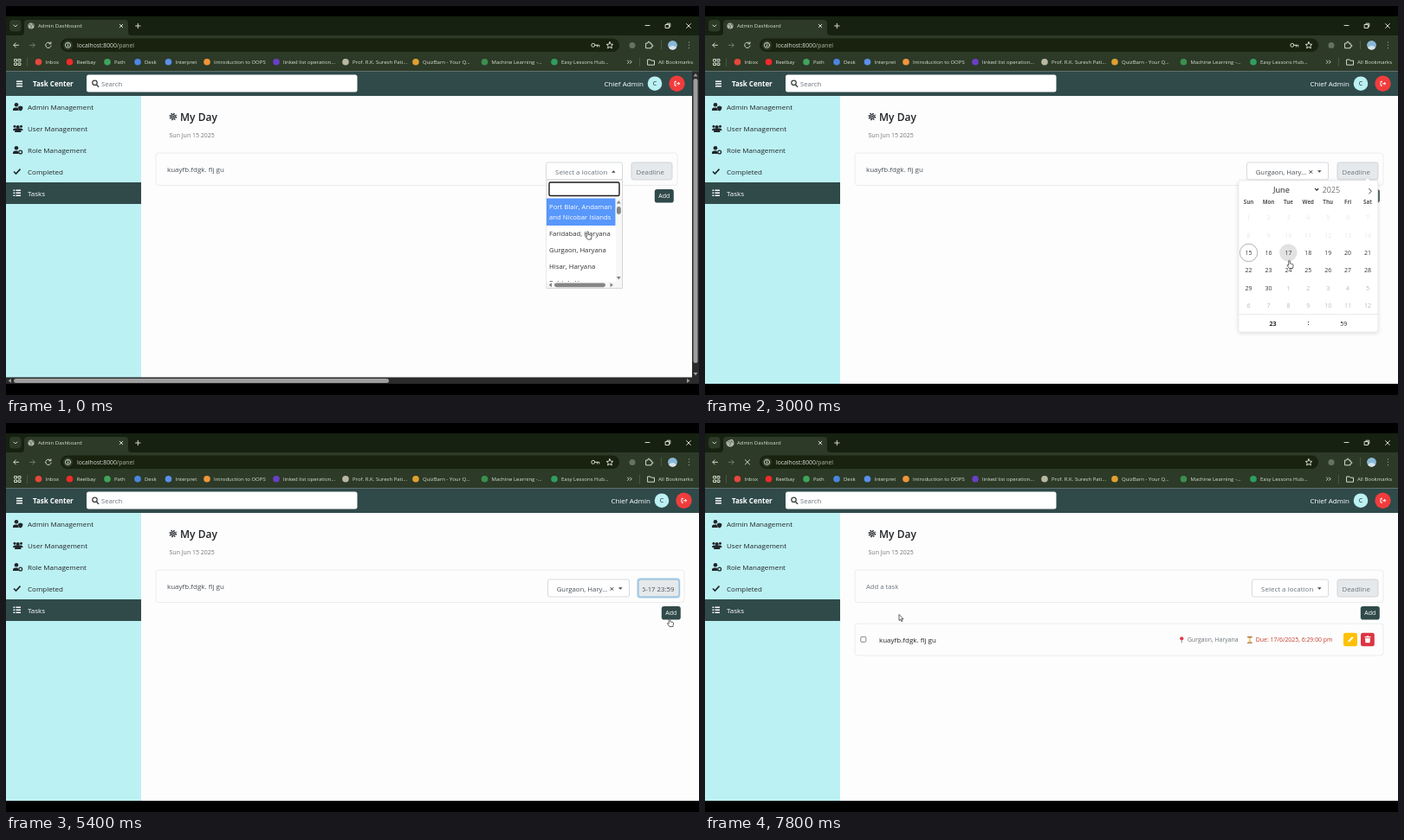
Animation, 800 px wide and 450 px high, one loop 8000 ms. Source, as an HTML page:

```html
<!DOCTYPE html>
<html lang="en">
<head>
<meta charset="utf-8">
<title>Admin Dashboard</title>
<style>
  html, body { margin: 0; width: 100%; height: 100%; overflow: hidden; background: #000; }
  svg { display: block; width: 100%; height: 100%; }
  text { font: 8px "Open Sans", "Noto Sans", sans-serif; fill: #212529; white-space: pre; }
  .ui text { font-size: 6px; fill: #dbe2d6; }
  .ui .url { font-size: 6.8px; }
  .line { fill: none; stroke: #d3dacd; stroke-width: 1; stroke-linecap: round; stroke-linejoin: round; }
  .mid { text-anchor: middle; }
  .white { fill: #fff; }
  .grey { fill: #6c757d; }
  .b { font-weight: 700; }
  .s7 { font-size: 7px; }
  .field { fill: #fff; stroke: #ccd1d6; stroke-width: .8; }
  .slate { fill: #304a4a; }
  .card { fill: #fdfdfd; stroke: #e6e8e9; stroke-width: .8; }
</style>
</head>
<body>
<svg viewBox="0 0 800 450">
  <defs>
    <clipPath id="valueClip"><rect x="735" y="181" width="36.5" height="20"/></clipPath>
    <clipPath id="listClip"><rect x="624" y="222" width="80" height="97"/></clipPath>
    <filter id="soft" x="-10%" y="-10%" width="120%" height="120%">
      <feDropShadow dx="0" dy="1" stdDeviation="2" flood-opacity=".16"/>
    </filter>
  </defs>

  <rect width="800" height="450"/>

  <!-- browser window -->
  <g class="ui">
    <rect y="12" width="800" height="23" fill="#162111"/>
    <rect y="34" width="800" height="42" fill="#2c3a27"/>
    <path d="M17 34q4 0 4-4V20q0-4 4-4H137q4 0 4 4v10q0 4 4 4z" fill="#2c3a27"/>
    <rect x="4" y="16" width="13.5" height="13.5" rx="4" fill="#2c3a27"/>
    <path class="line" d="M8.8 22l2 2 2-2M131.200 21.200l3.600 3.600M134.800 21.200l-3.600 3.600M152.300 20.300v5.400M149.600 23h5.400M738 22.500h5M785.600 20.600l4.800 4.800M790.400 20.600l-4.800 4.800M761.500 21.500h4v4h-4zM763 21.500v-1.300h3.800V24h-1.300"/>
    <text x="37" y="25.200">Admin Dashboard</text>
    <g data-on="0 5600 7600 8000">
      <circle cx="29" cy="23" r="3.600" fill="#aeb5aa"/>
      <path d="M26.500 21.500l2 .5 1 1.500-1 2M30 20l1 2 1.500 0" fill="none" stroke="#586454" stroke-width="1"/>
    </g>
    <path id="spinner" data-on="5600 8000" class="line" d="M29 19a4 4 0 1 0 4 4"/>

    <path class="line" d="M14.500 45.300H9M11.300 42.800L8.800 45.300l2.500 2.500"/>
    <path class="line" opacity=".4" d="M27.500 45.300h5.500M30.800 42.800l2.500 2.500-2.500 2.500"/>
    <path data-on="0 5600" class="line" d="M51.500 43.300a3.200 3.200 0 1 0 .6 2.800M51.900 41.800v2h-2"/>
    <path data-on="5600 8000" class="line" d="M46.400 42.700l5.200 5.200M51.600 42.700l-5.200 5.200"/>
    <rect x="63" y="37.500" width="645" height="15.500" rx="7.700" fill="#18220f"/>
    <circle cx="71.500" cy="45.300" r="5.600" fill="#2c3a27"/>
    <circle cx="71.500" cy="45.300" r="3" class="line" stroke-width=".8"/>
    <path class="line" d="M71.500 45v1.500M71.500 43.700v0" stroke-width=".8"/>
    <text class="url" x="82" y="47.800">localhost:8000<tspan fill="#b1baab">/panel</tspan></text>
    <path data-on="0 7600" class="line" d="M679.800 45.300a2 2 0 1 1-4 0a2 2 0 1 1 4 0h5v1.700M682.500 45.300v1.700"/>
    <path class="line" stroke-width=".9" d="M697 41.600l1.100 2.500 2.700.3-2 1.800.6 2.700-2.400-1.400-2.400 1.400.6-2.700-2-1.800 2.700-.3z"/>
    <circle cx="723" cy="45.500" r="3.500" fill="#667360"/>
    <path class="line" d="M739 43h2q-.3-2 1-2t1 2h2v2q2-.3 2 1t-2 1v1.800h-6z"/>
    <path d="M756.500 40v10" stroke="#52604c" stroke-width=".8"/>
    <circle cx="769.500" cy="45.300" r="5.400" fill="#8ab8d8"/>
    <path d="M765 48q4.500-4 9 0a5 5 0 0 1-9 0z" fill="#d9e3e8"/>
    <path d="M788.500 42v0M788.500 45.300v0M788.500 48.600v0" class="line" stroke-width="1.500"/>

    <path class="line" stroke-width=".9" d="M10 61.500h2.500v2.500H10zM14.500 61.500H17v2.500h-2.500zM10 66h2.500v2.500H10zM14.500 66H17v2.500h-2.500z"/>
    <path d="M24.500 60v10" stroke="#52604c" stroke-width=".7"/>
    <g id="bookmarks"></g>
    <path class="line" stroke-width=".9" d="M717.500 63l1.700 1.700-1.700 1.700M720.500 63l1.700 1.700-1.700 1.700M741 62h3l1 1.200h3.500v5H741z"/>
    <path d="M731.500 60v10" stroke="#52604c" stroke-width=".7"/>
    <text x="753" y="67">All Bookmarks</text>
  </g>

  <!-- page -->
  <rect y="75.500" width="800" height="361.500" fill="#fdfdfd"/>
  <rect y="75.500" width="800" height="28.500" class="slate"/>
  <path d="M12 87.200h7M12 90h7M12 92.800h7" stroke="#fff" stroke-width="1.400"/>
  <text class="white b" x="31" y="93">Task Center</text>
  <rect x="93" y="79.500" width="312.500" height="20" rx="2.500" fill="#fff"/>
  <path d="M104.500 91.200l2.600 2.600" stroke="#444" stroke-width="1.600"/>
  <circle cx="102.500" cy="88.800" r="2.700" fill="none" stroke="#444" stroke-width="1.300"/>
  <text class="grey" x="110" y="92.700" style="font-size:7.700px">Search</text>

  <rect y="104" width="156" height="333" fill="#bcf1f3"/>
  <rect y="204" width="156" height="25" class="slate"/>
  <g id="menu"></g>
  <g fill="#212529">
    <g id="person"><circle cx="12" cy="114.300" r="2.300"/><path d="M8 121v-1q0-2.600 2.600-2.600h2.800l1.500 3.600z"/></g>
    <path d="M16.700 115.500l2.600 1v2q-.5 2.400-2.600 3.100-2.100-.7-2.600-3.100v-2z"/>
    <circle cx="10" cy="139.300" r="1.500"/><circle cx="17.500" cy="139.300" r="1.500"/><circle cx="13.700" cy="140" r="2"/>
    <path d="M8 144q0-2.600 2.500-2.600h6.500q2.500 0 2.500 2.600zM10 146q0-3.200 3-3.200h1.500q3 0 3 3.200z"/>
    <use href="#person" y="50"/><circle cx="16.700" cy="169" r="1.900" fill="none" stroke="#212529" stroke-width="1.300"/>
  </g>
  <path d="M9 191.500l2.500 2.500 5-5.400" fill="none" stroke="#212529" stroke-width="1.600"/>
  <path d="M8.500 213.200h1.800M8.500 216.200h1.800M8.500 219.200h1.800M11.500 213.200h5.500M11.500 216.200h5.500M11.500 219.200h5.500" stroke="#fff" stroke-width="1.400"/>

  <g fill="none" stroke="#212529">
    <circle cx="192.800" cy="128" r="2.500" stroke-width="1"/>
    <circle cx="192.800" cy="128" r="3.700" stroke-width="1.300" stroke-dasharray="1.500 1.406"/>
    <path d="M190 128h5.600M192.800 125.200v5.600M190.900 126.100l3.800 3.800M194.700 126.100l-3.800 3.800" stroke-width=".6"/>
  </g>
  <text x="201" y="132.800" style="font-size:12px;font-weight:600">My Day</text>
  <text class="s7" x="188.500" y="152" style="fill:#777">Sun Jun 15 2025</text>

  <rect id="formCard" class="card" x="173" y="170" width="610" height="37.500" rx="3.500"/>
  <text data-on="0 7600" x="186" y="192.300" style="fill:#495057">kuayfb.fdgk. flj gu</text>
  <text data-on="7600 8000" class="grey" x="186" y="192.300" style="font-size:7.700px">Add a task</text>

  <g id="right">
    <text class="white" x="744" y="93" text-anchor="end">Chief Admin</text>
    <circle cx="757" cy="89.700" r="8.300" fill="#bcf1f3"/>
    <text class="mid s7" x="757" y="92.200">C</text>
    <circle cx="782.500" cy="89.700" r="9.200" fill="#f23c3c"/>
    <path d="M782 87.300h-2v4.800h2M782 89.700h3.500M784 88l1.700 1.700-1.700 1.700" fill="none" stroke="#fff" stroke-width="1"/>

    <g data-on="0 800 7600 8000">
      <rect class="field" x="631.500" y="181" width="88" height="20" rx="2"/>
      <text class="grey" x="642" y="194.600">Select a location</text>
    </g>
    <g data-on="800 7600">
      <rect class="field" x="625.500" y="181" width="94" height="20" rx="2"/>
      <text x="635.700" y="194.600" style="fill:#495057;font-size:7.800px">Gurgaon, Hary...</text>
      <path d="M697.700 190.200l3.400 3.400M701.100 190.200l-3.400 3.400" stroke="#333"/>
    </g>
    <path data-on="800 8000" d="M707 190.200h4.600l-2.300 2.500z" fill="#444"/>
    <path data-on="0 800" d="M707 192.700h4.600l-2.300-2.500z" fill="#444"/>

    <rect data-on="4800 5600" x="728.300" y="179.300" width="50" height="23.400" rx="3.500" fill="#bdd9ec"/>
    <rect id="deadline" x="730" y="181" width="47" height="20" rx="2.500" fill="#e6e9eb" stroke="#c8cdd2" stroke-width=".8"/>
    <text data-on="0 3400 7600 8000" class="grey" x="735.500" y="194.500" style="font-size:7.800px">Deadline</text>
    <g clip-path="url(#valueClip)">
      <text data-on="3400 5600" x="771.500" y="194.500" text-anchor="end" style="fill:#495057;font-size:7.800px">2025-06-17 23:59</text>
      <text data-on="5600 7600" x="735.500" y="194.500" style="fill:#495057;font-size:7.800px">2025-06-17 23:59</text>
    </g>

    <rect data-on="5600 7600" x="755.300" y="210.500" width="25" height="18.500" rx="4" fill="#9fd0da"/>
    <rect x="756.800" y="212" width="22" height="15.500" rx="2.800" class="slate"/>
    <text class="white mid s7" x="767.800" y="222.400">Add</text>
  </g>

  <g data-on="0 800">
    <rect x="624" y="201" width="87.500" height="125.500" fill="#fff" stroke="#c4c4c4" stroke-width=".7"/>
    <rect x="627" y="204" width="81" height="15.500" rx="1.500" fill="#fff" stroke="#1b1b1b" stroke-width="1.400"/>
    <g id="options" clip-path="url(#listClip)"></g>
    <rect x="704" y="222" width="7" height="97" fill="#f7f7f7"/>
    <rect x="624.500" y="319" width="86.500" height="7" fill="#f7f7f7"/>
    <g fill="#858585">
      <rect x="705" y="232" width="4.800" height="9" rx="2.400"/>
      <rect x="633" y="320.400" width="59" height="4.800" rx="2.400"/>
      <path d="M704.800 228.500h5l-2.500-3.500zM704.800 313h5l-2.500 3.500zM630 320.300v5l-3.500-2.500zM697.500 320.300v5l3.500-2.500z"/>
    </g>
    <rect x="792" y="75.500" width="8" height="361.500" fill="#2b2b2b"/>
    <rect y="429.500" width="800" height="7.500" fill="#2b2b2b"/>
    <g fill="#9e9e9e">
      <rect x="793.500" y="84" width="5" height="329" rx="2.500"/>
      <rect x="9" y="431" width="433" height="5" rx="2.500"/>
      <path d="M793.500 81.500h5l-2.500-3.500zM793.500 424h5l-2.500 3.500zM6 431v5l-3.500-2.500zM786 431v5l3.500-2.500z"/>
    </g>
  </g>

  <g data-on="7600 8000">
    <rect class="card" x="173" y="232" width="610" height="37" rx="3.500"/>
    <rect x="179.800" y="247.300" width="6" height="6" rx="1" fill="#fff" stroke="#666" stroke-width=".8"/>
    <text x="201" y="253.600">kuayfb.fdgk. flj gu</text>
    <path d="M550.300 250v4.500" stroke="#888" stroke-width=".9"/>
    <circle cx="550.300" cy="249.300" r="2.100" fill="#e0364c"/>
    <text class="grey" x="557" y="253.300" style="font-size:6.900px">Gurgaon, Haryana</text>
    <path d="M626.800 248h4.200l-1.700 2.800 1.700 3h-4.200l1.700-3z" fill="#e8c66a"/>
    <path d="M626 247.500h5.800M626 254.300h5.800" stroke="#a45a35" stroke-width="1"/>
    <text x="635.800" y="253.300" style="font-size:6.900px;fill:#c43c2c">Due: 17/6/2025, 6:29:00 pm</text>
    <rect x="737" y="242.800" width="16" height="15.500" rx="2.500" fill="#ffc107"/>
    <path d="M742.300 253.300l.4-1.800 4.400-4.400 1.500 1.500-4.400 4.400z" fill="#fff"/>
    <rect x="757" y="242.800" width="15.800" height="15.500" rx="2.500" fill="#dc3545"/>
    <path d="M761.500 247h2l.5-.8h2l.5.8h2v1h-7zM762 248.700h6l-.4 5.500h-5.200z" fill="#fff"/>
  </g>

  <g id="calendar" data-on="2400 4000">
    <path d="M616 204.500q0-2.500 2.500-2.500H762l2.800-3 2.800 3h6.700q2.500 0 2.500 2.500v170q0 2.500-2.500 2.500H618.500q-2.500 0-2.500-2.500z" fill="#fff" stroke="#e2e2e2" stroke-width=".6" filter="url(#soft)"/>
    <text x="656" y="216" style="font-size:9.200px">June</text>
    <path d="M704.200 211.200l2 2 2-2" fill="none" stroke="#222" stroke-width="1.200"/>
    <text x="712.800" y="216" style="font-size:8.900px;font-weight:300">2025</text>
    <path d="M766.300 211l3 3.200-3 3.200" fill="none" stroke="#333" stroke-width=".9"/>
    <g id="days"></g>
    <path d="M616 356.700h161" stroke="#e2e2e2" stroke-width=".8"/>
    <text class="mid b s7" x="655.500" y="369.600">23</text>
    <text class="mid b s7" x="696.500" y="369.300">:</text>
    <text class="mid s7" x="737.300" y="369.600">59</text>
  </g>

  <g id="cursor" fill="#fff" stroke="#222" stroke-width=".7" stroke-linejoin="round">
    <path id="arrow" d="M0 0v7l1.600-1.400 1.100 2.500 1.200-.5-1.100-2.500h2.200z"/>
    <path id="hand" d="M-.8 .8q.8-1.200 1.600 0v3l3 .8q1 .3.800 1.500l-.7 3.400h-4l-2.400-3.300q-.3-1.200 1.700-.2z"/>
  </g>
</svg>
<script>
const $ = id => document.getElementById(id);
const LOOP = 8000, STEP = 200;

const bookmarks = [
  [37.5, "#e5483c", "Inbox"], [73.5, "#f02a2a", "Reelbay"], [117, "#3fa45b", "Path"],
  [152, "#4a86e0", "Desk"], [187.5, "#5b8fe8", "Interpret"], [232, "#f0953a", "Introduction to OOPS"],
  [312, "#6a3fc4", "linked list operation..."], [392, "#b9b7a2", "Prof. R.K. Suresh Pati..."],
  [473, "#e0a030", "QuizBarn - Your Q..."], [552.5, "#3b8f4e", "Machine Learning -..."],
  [633, "#2f9e5f", "Easy Lessons Hub..."]
];
$("bookmarks").innerHTML = bookmarks.map(([x, color, name]) =>
  `<circle cx="${x}" cy="64.7" r="3.8" fill="${color}"/><text x="${x + 8}" y="67">${name}</text>`).join("");

$("menu").innerHTML = ["Admin Management", "User Management", "Role Management", "Completed", "Tasks"]
  .map((name, i) => `<text x="25" y="${119.8 + 25 * i}" class="${i === 4 ? "white" : ""}">${name}</text>`).join("");

const options = [
  [222.5, 31.5, "Port Blair, Andaman", "and Nicobar Islands"], [254, 19, "Faridabad, Haryana"],
  [273, 18.7, "Gurgaon, Haryana"], [291.7, 18.6, "Hisar, Haryana"], [310.3, 18.6, "Rohtak, Haryana"]
];
$("options").innerHTML = options.map(([y, h, ...lines]) =>
  `<g><rect x="624" y="${y}" width="79.5" height="${h}"/>` + lines.map((line, i) =>
    `<text x="627" y="${y + 12.3 + 12.6 * i}" style="font-size:7.75px;fill:inherit">${line}</text>`).join("") + "</g>").join("");

const cellX = i => 627.6 + 22.9 * (i % 7);
const cellY = i => 244.7 + 20.35 * Math.floor(i / 7);
const TODAY = 14, PICKED = 16, JUNE = 30;
$("days").innerHTML = ["Sun", "Mon", "Tue", "Wed", "Thu", "Fri", "Sat"].map((d, i) =>
  `<text class="mid b" x="${cellX(i)}" y="229" style="font-size:6.2px;fill:#555">${d}</text>`).join("") +
  Array.from({ length: 42 }, (_, i) => {
    const opacity = i < TODAY ? .12 : i < JUNE ? 1 : .35;
    return `<g class="day"><circle cx="${cellX(i)}" cy="${cellY(i)}" r="10.2" fill="none" stroke-width=".8"/>
      <text class="mid s7" x="${cellX(i)}" y="${cellY(i) + 2.6}" opacity="${opacity}">${i < JUNE ? i + 1 : i - JUNE + 1}</text></g>`;
  }).join("");

// time, x, y of the pointer tip
const path = [
  [0, 671.5, 260.5], [200, 668, 267], [400, 660, 279], [800, 659, 280], [1200, 712, 226],
  [1600, 747, 191], [2200, 748, 191], [2400, 744, 204], [3000, 674.5, 294], [3400, 674, 290],
  [4000, 606, 392], [4400, 638.5, 356.5], [4800, 748, 194], [5200, 766, 226], [5600, 766, 226],
  [6200, 520, 282], [6600, 340, 284], [7000, 269.5, 246], [7400, 240, 231], [7800, 224, 221.5], [LOOP, 224, 221.5]
];

function pointer(t) {
  const i = path.findIndex(p => p[0] > t);
  const [t0, x0, y0] = path[i - 1], [t1, x1, y1] = path[i];
  const k = (t - t0) / (t1 - t0);
  return [x0 + (x1 - x0) * k, y0 + (y1 - y0) * k];
}

const show = (el, on) => { el.style.display = on ? "" : "none"; };
const move = (id, x, y) => $(id).setAttribute("transform", `matrix(1 0 0 1 ${x} ${y})`);
const timed = [...document.querySelectorAll("[data-on]")].map(el => [el, el.dataset.on.split(" ").map(Number)]);
const days = [...document.querySelectorAll(".day")];

function render(t) {
  for (const [el, r] of timed) show(el, r.some((start, i) => i % 2 === 0 && t >= start && t < r[i + 1]));

  const [x, y] = pointer(t);
  const scrollbars = t < 800, calendarOpen = t >= 2400 && t < 4000;
  move("right", scrollbars ? -8 : 0, 0);
  $("formCard").setAttribute("width", scrollbars ? 602 : 610);
  $("deadline").setAttribute("stroke", t >= 4800 && t < 5600 ? "#71a9ce" : "#c8cdd2");
  $("spinner").setAttribute("transform", `rotate(${(t - 7000) * .36} 29 23)`);

  const active = t < 200 ? 0 : t < 400 ? 1 : 2;
  [...$("options").children].forEach((row, i) => {
    row.firstChild.setAttribute("fill", i === active ? "#5897fb" : "#fff");
    row.style.fill = i === active ? "#fff" : "#333";
  });

  const opening = calendarOpen && t < 2600;
  move("calendar", 0, opening ? -6 : 0);
  $("calendar").setAttribute("opacity", opening ? .8 : 1);
  let overDay = false;
  days.forEach((day, i) => {
    const hover = calendarOpen && i >= TODAY && Math.hypot(x - cellX(i), y - cellY(i)) < 10.2;
    const picked = i === PICKED && t >= 3400;
    overDay ||= hover;
    const [circle, label] = day.children;
    circle.setAttribute("fill", picked ? "#569ff7" : hover ? "#e2e2e2" : "none");
    circle.setAttribute("stroke", i === TODAY ? "#959ea9" : "none");
    label.style.fill = picked ? "#fff" : "#393939";
  });

  const hand = scrollbars || overDay || (t >= 5200 && t < 5800);
  show($("hand"), hand);
  show($("arrow"), !hand);
  move("cursor", x, y);
}

const start = performance.now();
function tick() {
  const t = (performance.now() - start) % LOOP;
  render(Math.floor(t / STEP) * STEP);
  requestAnimationFrame(tick);
}
tick();
</script>
</body>
</html>
```
